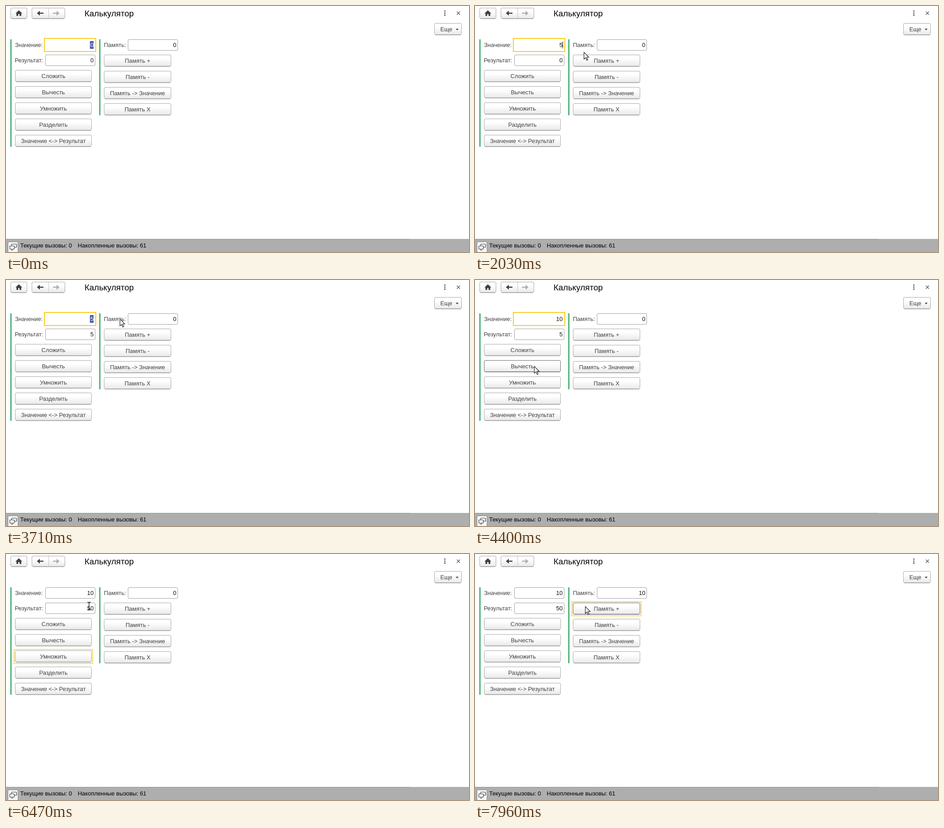
An HTML page for the animation above (7990 ms loop, 1026 px wide and 546 px high).

```html
<!DOCTYPE html>
<html lang="ru">
<head>
<meta charset="utf-8">
<title>Калькулятор</title>
<style>
  html, body { margin: 0; width: 100%; height: 100%; overflow: hidden; background: #fff; }
  svg { display: block; width: 1026px; height: 546px; }
  text { font: 13px "Liberation Sans", Arial, sans-serif; fill: #404040; white-space: pre; }
  .title { font-size: 18.67px; fill: #000; }
  .num { text-anchor: end; fill: #111; }
  .mid { text-anchor: middle; }
  .status { font-size: 12.9px; fill: #000; }
  .box { fill: #fff; stroke: #a0a0a0; }
  .btn rect { fill: url(#face); stroke: #a8a8a8; }
  .btn path { stroke: #b4b4b4; }
  .btn.hover rect { stroke: #686868; }
  .btn.down rect { fill: #e8e8e8; stroke: #707070; }
  .btn.down text { transform: translateY(1px); }
  .ring { fill: none; stroke: #fdcf3e; stroke-width: 1.5; }
  .focus { fill: #fff; stroke: #fccb1e; stroke-width: 2; }
</style>
</head>
<body>
<svg viewBox="0 0 1026 546">
  <defs>
    <linearGradient id="face" x2="0" y2="1">
      <stop offset=".3" stop-color="#fff"/><stop offset="1" stop-color="#e9e9e9"/>
    </linearGradient>
  </defs>
  <rect width="1026" height="546" fill="#fff"/>

  <g id="chrome"></g>
  <path d="M28.5 9.5 L21 16.5 H23.2 V22 H27 V18 H30 V22 H33.8 V16.5 H36 Z" fill="#404040"/>
  <path d="M94.5 5 V28" stroke="#c4c4c4"/>
  <path id="back" d="M68.5 16 L75 10.5 V14.7 H83 V17.3 H75 V21.5 Z" fill="#404040"/>
  <use href="#back" transform="matrix(-1 0 0 1 187 0)" opacity=".4"/>
  <text class="title" x="174" y="23">Калькулятор</text>
  <path d="M972.5 11.3 v.01 m0 4.4 v.01 m0 4.4 v.01" stroke="#505050" stroke-width="3" stroke-linecap="round"/>
  <path d="M999 12.5 l7 7 m0 -7 l-7 7" stroke="#555" stroke-width="1.2"/>
  <text x="962.5" y="56">Еще</text>
  <path d="M996.5 50.5 h6.5 l-3.25 3.5 Z" fill="#404040"/>

  <path d="M11 74 V312.5 M208 74 V242.5" stroke="#0c9442" stroke-width="2"/>
  <text x="20" y="91">Значение:</text>
  <text x="19.5" y="125">Результат:</text>
  <text x="217" y="91">Память:</text>
  <g id="form"></g>

  <rect id="focus" class="focus" x="85" y="72" width="114" height="29"/>
  <rect id="sel" x="186" y="78" width="8" height="17" fill="#4059a6"/>
  <text id="value" class="num" x="194.3" y="91"></text>
  <text id="result" class="num" x="194.3" y="125"></text>
  <text id="memory" class="num" x="377.5" y="91"></text>
  <rect id="caret" y="79" width="1" height="15"/>
  <rect id="ring" class="ring" height="31.5"/>

  <rect y="517" width="1026" height="29" fill="#aeaeae"/>
  <path d="M0 517.5 H895" stroke="#8f8f8f"/>
  <rect x="4.5" y="523.5" width="22" height="24" rx="2.5" fill="#f6f6f6" stroke="#8a8a8a"/>
  <g fill="#f6f6f6" stroke="#3c3c3c" stroke-width="1.2">
    <rect x="12.5" y="528.5" width="11" height="7" rx="1"/>
    <rect x="8.5" y="532.5" width="10" height="7" rx="1"/>
    <path d="M11 541.8 h5"/>
  </g>
  <text class="status" x="31.5" y="536">Текущие вызовы: 0</text>
  <text class="status" x="159" y="536">Накопленные вызовы: 61</text>

  <g id="hint">
    <rect x="116.5" y="247.5" width="76" height="23" fill="#fff" stroke="#a8a8a8"/>
    <text class="mid" x="154.5" y="263.5">Умножить</text>
  </g>
  <g id="pointer">
    <circle id="spot" r="12" fill="#f6ee0c" opacity=".72"/>
    <path id="arrow" d="M.5 .5 V16 L4.2 12.7 L6.7 18.5 L9 17.5 L6.5 11.8 H11.3 Z" fill="#fff" stroke="#151515" stroke-width="1.1"/>
    <path id="beam" d="M-3.5 -8 h2 L0 -6.5 L1.5 -8 h2 M0 -6.5 V7.5 M-3.5 9 h2 L0 7.5 L1.5 9 h2" fill="none" stroke="#111" stroke-width="1.3"/>
  </g>
</svg>
<script>
const LOOP = 7990, BLINK = 530;
const $ = id => document.getElementById(id);

const column = (id, x, y, w, labels) =>
  labels.map((label, i) => ({ id: id + i, label, x, y: y + 36 * i, w }));
const buttons = [
  ...column("op", 20, 142, 170, ["Сложить", "Вычесть", "Умножить", "Разделить", "Значение &lt;-&gt; Результат"]),
  ...column("mem", 217, 108, 149, ["Память +", "Память -", "Память -&gt; Значение", "Память X"]),
];
const fields = [[87, 74], [87, 108], [270, 74]];

// Button face with a soft shadow row below it
const face = (x, y, w, h) =>
  `<path d="M${x + 2} ${y + h + .5} h${w - 4}"/>` +
  `<rect x="${x + .5}" y="${y + .5}" width="${w - 1}" height="${h - 1}" rx="2.5"/>`;

$("chrome").innerHTML = [[10, 4, 37, 24], [57, 4, 74, 24], [949, 38, 61, 26]]
  .map(b => `<g class="btn">${face(...b)}</g>`).join("");
$("form").innerHTML =
  fields.map(([x, y]) => `<rect class="box" x="${x + .5}" y="${y + .5}" width="110" height="24" rx="2.5"/>`).join("") +
  buttons.map(b => `<g class="btn" id="${b.id}">${face(b.x, b.y, b.w, 26)}` +
    `<text class="mid" x="${b.x + b.w / 2}" y="${b.y + 18}">${b.label}</text></g>`).join("");

// What the user does; the calculator state follows from it
const actions = [
  { from: 1160, to: 1390, drag: true },
  { from: 1830, key: 5 },
  { from: 2630, to: 2740, press: "op0" },
  { from: 3130, to: 3430, drag: true },
  { from: 3760, key: 1 },
  { from: 3830, key: 0 },
  { from: 5460, to: 5690, hint: true },
  { from: 5690, to: 5790, press: "op2" },
  { from: 7430, to: 7530, press: "mem0" },
];
const effects = {
  op0: s => { s.result += s.value; },
  op2: s => { s.result *= s.value; },
  mem0: s => { s.memory += s.value; },
};

// Pointer moves: start, end, x, y
const entry = [966, 536];
const moves = [
  [130, 900, 160, 86],
  [1190, 1390, 259, 94],
  [1860, 2600, 126, 152],
  [2740, 3080, 165, 86],
  [3130, 3390, 252, 86],
  [3830, 4210, 130, 152],
  [4240, 4390, 131, 191],
  [4430, 4650, 117, 227],
  [5970, 6470, 184, 115],
  [6470, 7150, 254, 115],
  [7870, 7960, 244, 116],
];

function pointerAt(t) {
  let [x, y] = entry;
  for (const [from, to, nx, ny] of moves) {
    const u = Math.min(1, Math.max(0, (t - from) / (to - from)));
    const k = u * u * (3 - 2 * u);
    x += (nx - x) * k;
    y += (ny - y) * k;
  }
  return [Math.round(x), Math.round(y)];
}

function stateAt(t) {
  const s = { value: 0, result: 0, memory: 0, focus: "value", selected: true, since: 0 };
  for (const a of actions.filter(a => a.from <= t)) {
    const active = t < a.to;
    if (a.hint) { s.hint = active; continue; }
    s.since = a.from;
    s.held = active;
    s.dragged = a.drag;
    s.spot = active && t - a.from > 30;
    if (a.drag) {
      s.focus = "value";
      s.selected = t - a.from > 80;
    } else if (a.press) {
      s.focus = a.press;
      s.selected = false;
      if (!active) effects[a.press](s);
    } else {
      s.value = s.selected ? a.key : s.value * 10 + a.key;
      s.selected = false;
    }
  }
  return s;
}

const show = (id, on) => $(id).setAttribute("visibility", on ? "visible" : "hidden");
const inside = (x, y, left, top, w, h) => x >= left && x < left + w && y >= top && y < top + h;

function draw(t) {
  const [x, y] = pointerAt(t), s = stateAt(t);
  const visible = t >= moves[0][0], editing = s.focus === "value";

  for (const id of ["value", "result", "memory"]) $(id).textContent = s[id];
  $("value").style.fill = s.selected ? "#fff" : "";
  $("caret").setAttribute("x", s.dragged ? 186.5 : 194);
  show("sel", s.selected);
  show("caret", editing && !s.selected && (t - s.since) % (2 * BLINK) < BLINK);
  show("focus", editing);
  show("ring", !editing);
  show("hint", s.hint);

  for (const b of buttons) {
    const over = visible && inside(x, y, b.x, b.y, b.w, 26);
    $(b.id).classList.toggle("hover", over);
    $(b.id).classList.toggle("down", over && !!s.held);
    if (b.id === s.focus) {
      $("ring").setAttribute("x", b.x - 2.25);
      $("ring").setAttribute("y", b.y - 2.25);
      $("ring").setAttribute("width", b.w + 4.5);
    }
  }

  const overField = fields.some(([fx, fy]) => inside(x, y, fx, fy, 111, 25));
  show("arrow", visible && !overField);
  show("beam", visible && overField);
  show("spot", s.spot);
  $("pointer").setAttribute("transform", `translate(${x} ${y})`);
}

const start = performance.now();
function tick() {
  draw((performance.now() - start) % LOOP);
  requestAnimationFrame(tick);
}
tick();
</script>
</body>
</html>
```
